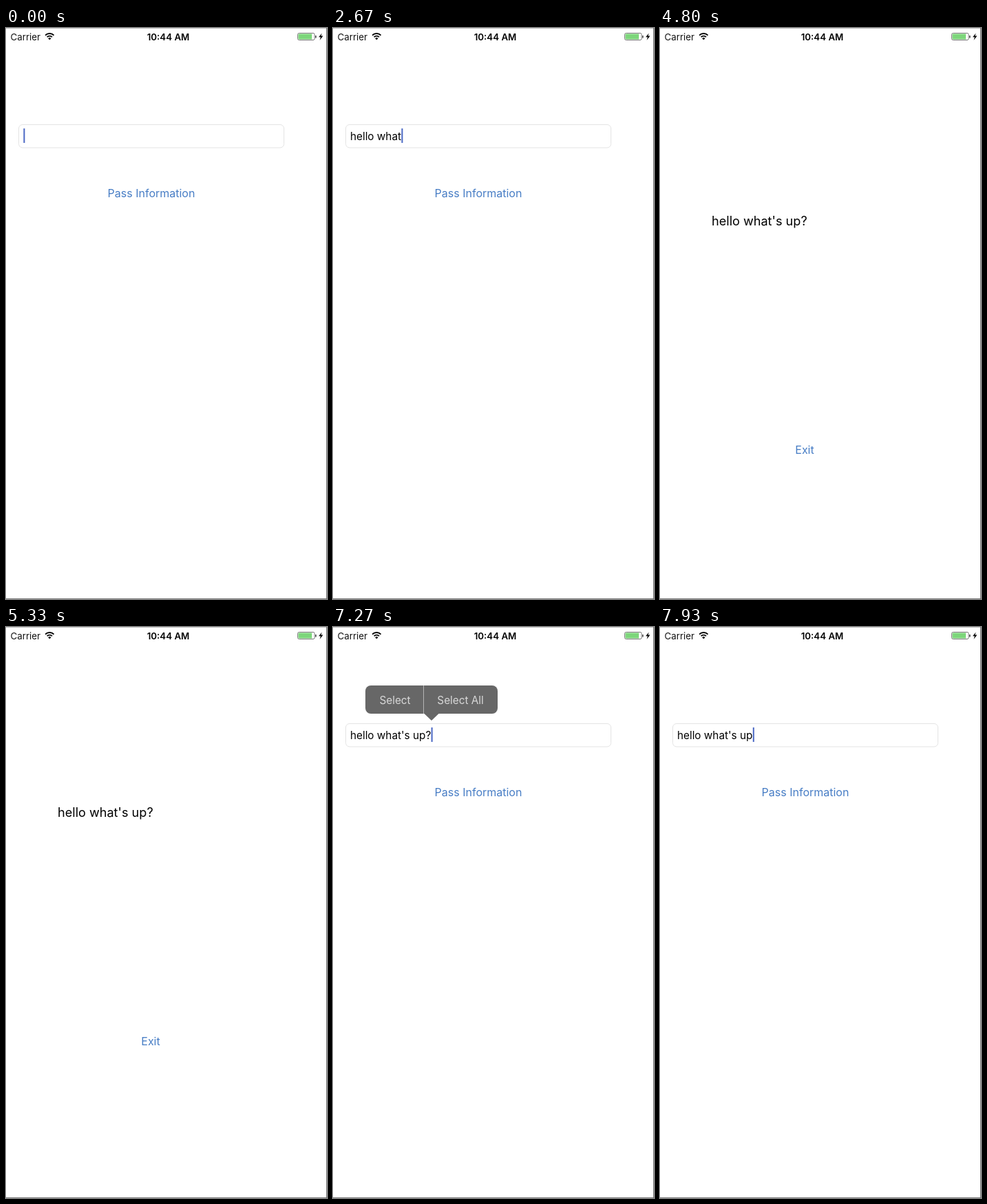
Recreate the animation shown at these times as an HTML page with a canvas. Size 466 by 830 pixels, loop 8 s.

```html
<!DOCTYPE html>
<html lang="en">
<head>
<meta charset="utf-8">
<title>Pass Information</title>
<style>
  html, body { margin: 0; width: 100%; height: 100%; overflow: hidden; background: #fff; }
  canvas { display: block; }
</style>
</head>
<body>
<canvas id="stage" width="466" height="830"></canvas>
<script>
const W = 466, H = 830, LOOP = 8000, TICK = 1000 / 15;
const ctx = document.getElementById('stage').getContext('2d');
const BLUE = '#477dc5', MESSAGE = "hello what's up?";
// Moment at which each character of the message is typed.
const KEY_TIMES = [870, 1130, 1470, 1600, 1800, 1930, 2130, 2320,
                   2450, 2600, 2790, 2920, 2990, 3060, 3250, 3590];
const DELETE_TIME = 7860;

const ramp = (t, from, to) => Math.min(1, Math.max(0, (t - from) / (to - from)));
// Remaining fraction of a critically damped spring.
const settle = ms => (1 + ms * 0.01575) * Math.exp(-ms * 0.01575);

function setFont(size, weight = 400) {
  ctx.font = `${weight} ${size}px Inter, "Open Sans", sans-serif`;
}

function text(str, x, y, size, { color = '#000', align = 'left', weight, alpha = 1 } = {}) {
  setFont(size, weight);
  ctx.textAlign = align;
  ctx.fillStyle = color;
  ctx.globalAlpha = alpha;
  ctx.fillText(str, x, y);
  ctx.globalAlpha = 1;
}

function rect(x, y, w, h, color) {
  ctx.fillStyle = color;
  ctx.fillRect(x, y, w, h);
}

function roundRect(x, y, w, h, r) {
  ctx.beginPath();
  ctx.roundRect(x, y, w, h, r);
}

function polygon(color, ...points) {
  ctx.beginPath();
  points.forEach(([x, y]) => ctx.lineTo(x, y));
  ctx.fillStyle = color;
  ctx.fill();
}

function typedText(t) {
  if (t >= DELETE_TIME) return MESSAGE.slice(0, -1);
  return MESSAGE.slice(0, KEY_TIMES.filter(k => k <= t).length);
}

function caretAlpha(t) {
  if (t < 530) return 1 - ramp(t, 10, 330);
  if (t < 4300) return 1 - ramp(t, 3940, 4260);
  return t >= 6860 ? 1 : 0;
}

function sheetTop(t) {
  if (t < 4600) return H;
  if (t < 5930) return H * settle(t - 4400);
  if (t < 6130) return 0;
  return H * (1 - settle(t - 6046));
}

function drawForm(t) {
  roundRect(18.5, 140.5, 385, 33.5, 5.5);
  ctx.strokeStyle = '#e4e4e4';
  ctx.lineWidth = 1;
  ctx.stroke();

  const typed = typedText(t);
  text(typed, 25, 162.5, 15.3);
  ctx.globalAlpha = caretAlpha(t);
  rect(25.4 + ctx.measureText(typed).width, 146, 2, 21, '#4a68c4');
  ctx.globalAlpha = 1;

  const pressed = t >= 4330 && t < 6130;
  text('Pass Information', 211, 245.5, 16, { color: BLUE, align: 'center', alpha: pressed ? 0.2 : 1 });
}

function drawMenu(alpha) {
  if (!alpha) return;
  ctx.globalAlpha = alpha;
  roundRect(47, 85, 192, 41, 8);
  ctx.fillStyle = '#676767';
  ctx.fill();
  polygon('#676767', [132, 125.5], [154, 125.5], [143, 136]);
  rect(131, 85, 1, 41, '#b4b4b4');
  const style = { color: '#d9d9d9', align: 'center', alpha };
  text('Select', 90, 111.5, 15.3, style);
  text('Select All', 185, 111.5, 15.3, style);
}

function drawSheet(t) {
  const top = sheetTop(t);
  if (top >= H) return;
  rect(0, top, W, H, '#fff');
  text(MESSAGE, 75, top + 275.5, 18.1, {});
  text('Exit', 210, top + 608, 16, { color: BLUE, align: 'center', alpha: t >= 5930 ? 0.2 : 1 });
}

function drawStatusBar() {
  text('Carrier', 6.5, 17.5, 13.3, { color: '#111' });
  text('10:44 AM', 235.5, 17.5, 13.3, { align: 'center', weight: 600 });

  ctx.strokeStyle = '#000';
  ctx.lineWidth = 1.9;
  for (const r of [5.2, 8.8]) {
    ctx.beginPath();
    ctx.arc(63.3, 16.8, r, -Math.PI * 0.75, -Math.PI * 0.25);
    ctx.stroke();
  }
  ctx.beginPath();
  ctx.moveTo(63.3, 17.3);
  ctx.arc(63.3, 17.3, 3, -Math.PI * 0.75, -Math.PI * 0.25);
  ctx.fillStyle = '#000';
  ctx.fill();

  roundRect(423.5, 7.5, 24.5, 10, 2);
  ctx.strokeStyle = '#777';
  ctx.lineWidth = 1;
  ctx.stroke();
  rect(424.5, 8.5, 19.5, 8, '#7dd67b');
  rect(449, 11, 1.5, 3.5, '#444');
  polygon('#000', [458.5, 7.5], [454, 13.3], [456.8, 13.3], [455.5, 17.8], [460.3, 11.6], [457.3, 11.6]);
}

function drawEdges() {
  rect(0, 0, W, 1, '#c4c4c4');
  rect(0, H - 1, W, 1, '#808080');
  rect(W - 1, 0, 1, H, '#6c6c6c');
}

function frame(now) {
  const t = Math.floor((now % LOOP + 5) / TICK) * TICK % LOOP;
  rect(0, 0, W, H, '#fff');
  drawForm(t);
  drawMenu(ramp(t, 6920, 7130) * (1 - ramp(t, 7340, 7600)));
  drawSheet(t);
  drawStatusBar();
  drawEdges();
  requestAnimationFrame(frame);
}

const start = performance.now();
(function play() {
  frame(0);
})();
</script>
</body>
</html>
```
